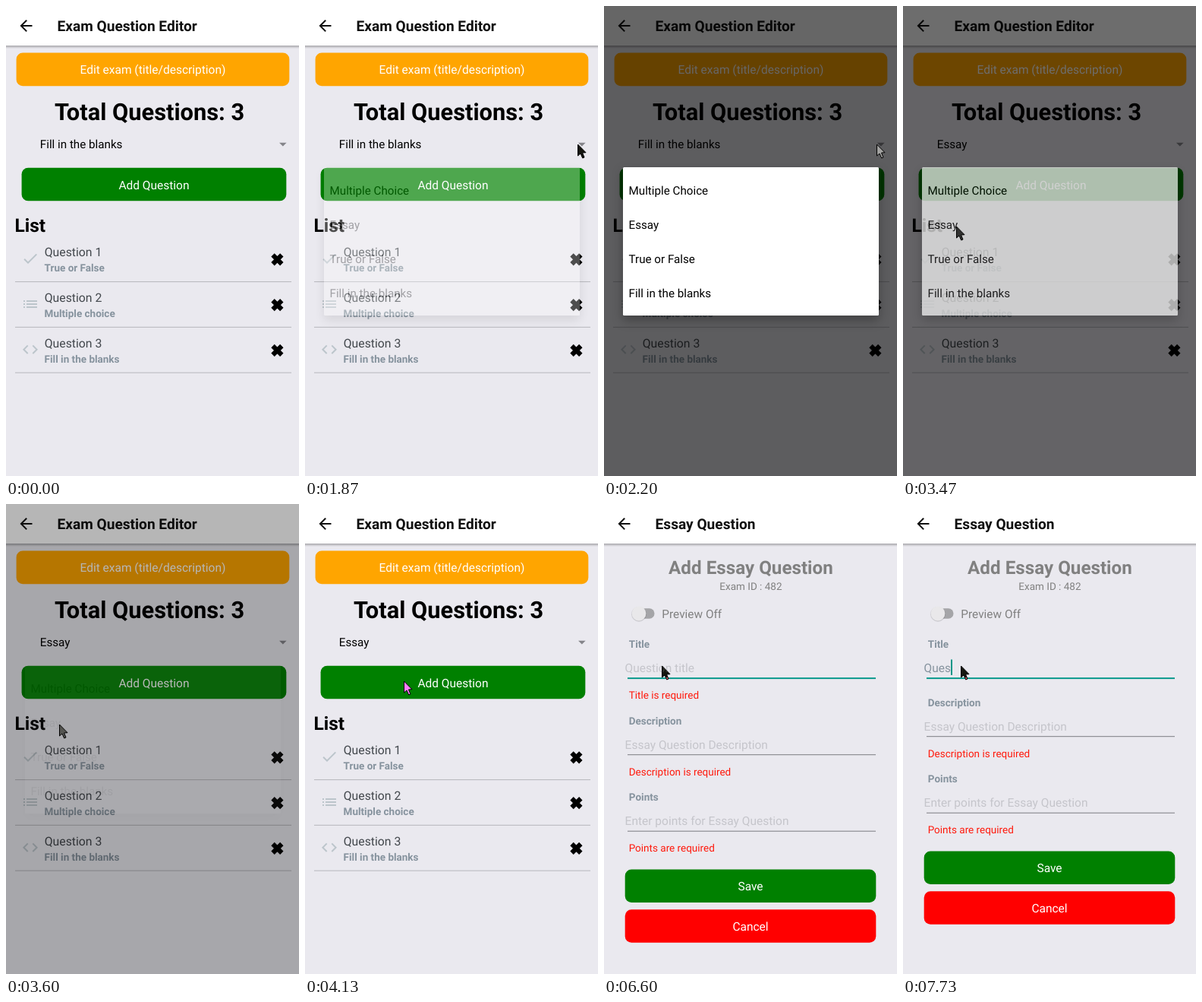
An HTML page for the animation above (8000 ms loop, 386x618 px).

```html
<!DOCTYPE html>
<html lang="en">
<head>
<meta charset="utf-8">
<title>Exam Question Editor</title>
<style>
  html, body { margin: 0; width: 100%; height: 100%; overflow: hidden; background: #eae9ef; }
  svg { display: block; width: 386px; height: 618px; }
  text { font: 15.5px Roboto, sans-serif; white-space: pre; text-rendering: geometricPrecision; }
  .head { font-weight: bold; font-size: 19.1px; fill: #111; }
  .btn { fill: #fff; text-anchor: middle; font-size: 15.5px; }
  .total { font-weight: bold; font-size: 30.8px; }
  .list { font-weight: bold; font-size: 24.5px; }
  .pick { font-size: 15.2px; }
  .row { font-size: 15.8px; fill: #43484d; }
  .sub { font-weight: bold; font-size: 13.5px; fill: #86939e; }
  .err { font-size: 13.5px; fill: #ff190c; }
  .big { font-weight: bold; font-size: 24.2px; fill: #808080; text-anchor: middle; }
  .id { font-size: 13.5px; fill: #808080; text-anchor: middle; }
  .gray { font-size: 15.4px; fill: #808080; }
  .hint { fill: #c5c5cb; }
  .typed { fill: #86939e; }
  .icon { fill: #bcc5cb; }
  #dialog rect { filter: drop-shadow(0 6px 7px rgba(0, 0, 0, .3)); }
  #fill { mix-blend-mode: difference; }
</style>
</head>
<body>
<svg id="stage" viewBox="0 0 386 618"></svg>
<script>
const text = (x, y, cls, s, id = '') => `<text x="${x}" y="${y}" class="${cls}" id="${id}">${s}</text>`;
const rect = (x, y, w, h, fill, more = '') =>
  `<rect x="${x}" y="${y}" width="${w}" height="${h}" fill="${fill}" ${more}/>`;
const button = (x, y, w, color, label) =>
  rect(x, y, w, 43.6, color, 'rx="8.5"') + text(x + w / 2, y + 27.8, 'btn', label);

const header = title =>
  rect(0, 0, 386, 618, '#eae9ef') + rect(0, 51, 386, 5, 'url(#shade)') + rect(0, 0, 386, 52, '#fff') +
  `<path fill="#111" transform="translate(14.5 14.1)"
    d="M20 11H7.83l5.59-5.59L12 4l-8 8 8 8 1.41-1.41L7.83 13H20z"/>` + text(67.6, 33.2, 'head', title);

const icons = {
  check: 'M9 16.17L4.83 12l-1.42 1.41L9 19 21 7l-1.41-1.41z',
  bullets: 'M3 13h2v-2H3zm0 4h2v-2H3zm0-8h2V7H3zm4 4h14v-2H7zm0 4h14v-2H7zM7 7v2h14V7z',
  code: 'M9.4 16.6L4.8 12l4.6-4.6L8 6l-6 6 6 6zm5.2 0l4.6-4.6-4.6-4.6L16 6l6 6-6 6z'
};
const row = ([icon, kind], i) => `<g transform="translate(0 ${i * 59.8})">
  <path class="icon" transform="translate(20 320.1)" d="${icons[icon]}"/>
  ${text(50.7, 329.2, 'row', 'Question ' + (i + 1))}${text(50.6, 349, 'sub', kind)}
  <path d="M351.5 327.4l11.8 11.8m0-11.8l-11.8 11.8" stroke="#000" stroke-width="6.2"/>
  ${rect(12, 362, 364, 1.1, '#bbbbc0')}</g>`;

const field = (y, label, hint, error, id = '') =>
  text(32.8, y, 'sub', label) + text(27.6, y + 32.4, 'hint', hint, id && id + 'Hint') +
  rect(31, y + 39.7, 327, 1, '#7c7c82', `id="${id && id + 'Line'}"`) +
  text(32.7, y + 67, 'err', error, id && id + 'Err');

const arrow = 'points=".5,1 .5,16 4,13 6.7,19 9,18 6.5,12 11,11.7"';

stage.innerHTML = `
<defs><linearGradient id="shade" x2="0" y2="1">
  <stop stop-opacity=".36"/><stop offset="1" stop-opacity="0"/></linearGradient></defs>
<g>
  ${header('Exam Question Editor')}
  ${button(13.6, 61.6, 359.7, '#ffa500', 'Edit exam (title/description)')}
  ${text(63.9, 149.6, 'total', 'Total Questions: 3')}
  ${text(44.8, 187.1, 'pick', '', 'choice')}
  <path d="M360 179.7h9.6l-4.8 4.9z" fill="#85858a"/>
  ${button(20.6, 212.7, 348.7, '#008000', 'Add Question')}
  ${text(11.5, 297, 'list', 'List')}
  ${[['check', 'True or False'], ['bullets', 'Multiple choice'], ['code', 'Fill in the blanks']].map(row).join('')}
</g>
${rect(0, 0, 386, 618, '#000', 'id="dim"')}
<g id="dialog">
  ${rect(25, 212, 337, 195, '#fff', 'rx="1.5"')}
  ${['Multiple Choice', 'Essay', 'True or False', 'Fill in the blanks']
    .map((s, i) => text(32.5, 247.6 + i * 45.2, 'pick', s)).join('')}
</g>
<g id="essay">
  ${header('Essay Question')}
  ${text(193.4, 92.2, 'big', 'Add Essay Question')}
  ${text(193.4, 113, 'id', 'Exam ID : 482')}
  ${rect(38, 137.3, 28.5, 13.4, '#a5a5a8', 'rx="6.7"')}
  <circle cx="46" cy="144.8" r="9.9" opacity=".14"/>
  <circle cx="46" cy="144" r="9.4" fill="#e9e8ea"/>
  ${text(76.3, 149.6, 'gray', 'Preview Off')}
  ${field(189, 'Title', 'Question title', 'Title is required', 'title')}
  ${text(27.6, 221.4, 'typed', '', 'typed')}
  ${rect(28, 204.5, 2, 20.5, '#009688', 'id="caret"')}
  <g id="rest">
    ${field(289.5, 'Description', 'Essay Question Description', 'Description is required')}
    ${field(390, 'Points', 'Enter points for Essay Question', 'Points are required')}
    ${button(27.7, 480.4, 330.6, '#008000', 'Save')}
    ${button(27.7, 533.2, 330.6, '#ff0000', 'Cancel')}
  </g>
</g>
<polygon id="fill" fill="#fff" ${arrow}/>
<polygon id="edge" fill="none" stroke="#000" ${arrow}/>`;

const $ = id => document.getElementById(id);
const set = (id, name, value) => $(id).setAttribute(name, value);
const show = (id, on) => set(id, 'visibility', on ? 'visible' : 'hidden');
const clamp = v => Math.max(0, Math.min(1, v));

const linear = p => p, out = p => p * (2 - p), smooth = p => p * p * (3 - 2 * p);
// Pointer path: tick, x, y, easing towards that point
const path = [
  [0, 390, 622], [2, 385, 613, linear], [3, 384, 612, linear], [4, 390, 620, linear],
  [7, 386, 311, linear], [16, 359, 181, smooth], [34, 359, 181, linear],
  [40, 156, 240, linear], [46, 70, 289, out], [57, 70, 289, linear],
  [62, 130, 232, smooth], [78, 130, 232, linear], [84, 74, 205, smooth], [85, 76, 212, linear]
];
function pointer(n) {
  const i = path.findIndex(k => k[0] > n);
  if (i < 0) return path[path.length - 1].slice(1, 3);
  const [t0, x0, y0] = path[i - 1], [t1, x1, y1, ease] = path[i];
  const p = ease((n - t0) / (t1 - t0));
  return [x0 + (x1 - x0) * p, y0 + (y1 - y0) * p];
}

function draw(ms) {
  const n = Math.floor((ms + 4) * .015);

  $('choice').textContent = n < 52 ? 'Fill in the blanks' : 'Essay';
  set('dim', 'opacity', .6 * (n < 50 ? clamp((n - 28) / 5) : clamp((56 - n) / 4.2)));
  set('dialog', 'opacity', n < 50 ? clamp((n - 27.2) / 2.6) : clamp((54.12 - n) / 3.1));

  const q = 1 - (1 - clamp((n - 71.69) / 5.25)) ** 5;
  set('essay', 'opacity', n < 72 ? 0 : q * q);
  set('essay', 'transform', `translate(0 ${49 * (1 - q)})`);

  const focus = n >= 90, count = [104, 110, 113, 116].filter(k => n >= k).length;
  const shifted = n >= 105;
  $('typed').textContent = 'Ques'.slice(0, count);
  show('titleHint', !count);
  show('titleErr', !shifted);
  set('rest', 'transform', `translate(0 ${shifted ? -24 : 0})`);
  set('titleLine', 'fill', focus ? '#009688' : '#7c7c82');
  set('titleLine', 'y', focus ? 228.2 : 228.7);
  set('titleLine', 'height', focus ? 1.9 : 1);
  show('caret', focus && (n < 99 || count));
  set('caret', 'x', [28, 38, 47, 55, 63][count]);

  const [x, y] = pointer(n).map(Math.round);
  for (const id of ['fill', 'edge']) set(id, 'transform', `translate(${x} ${y})`);
}

const start = performance.now();
function loop() {
  draw((performance.now() - start) % 8000);
  requestAnimationFrame(loop);
}
loop();
</script>
</body>
</html>
```
